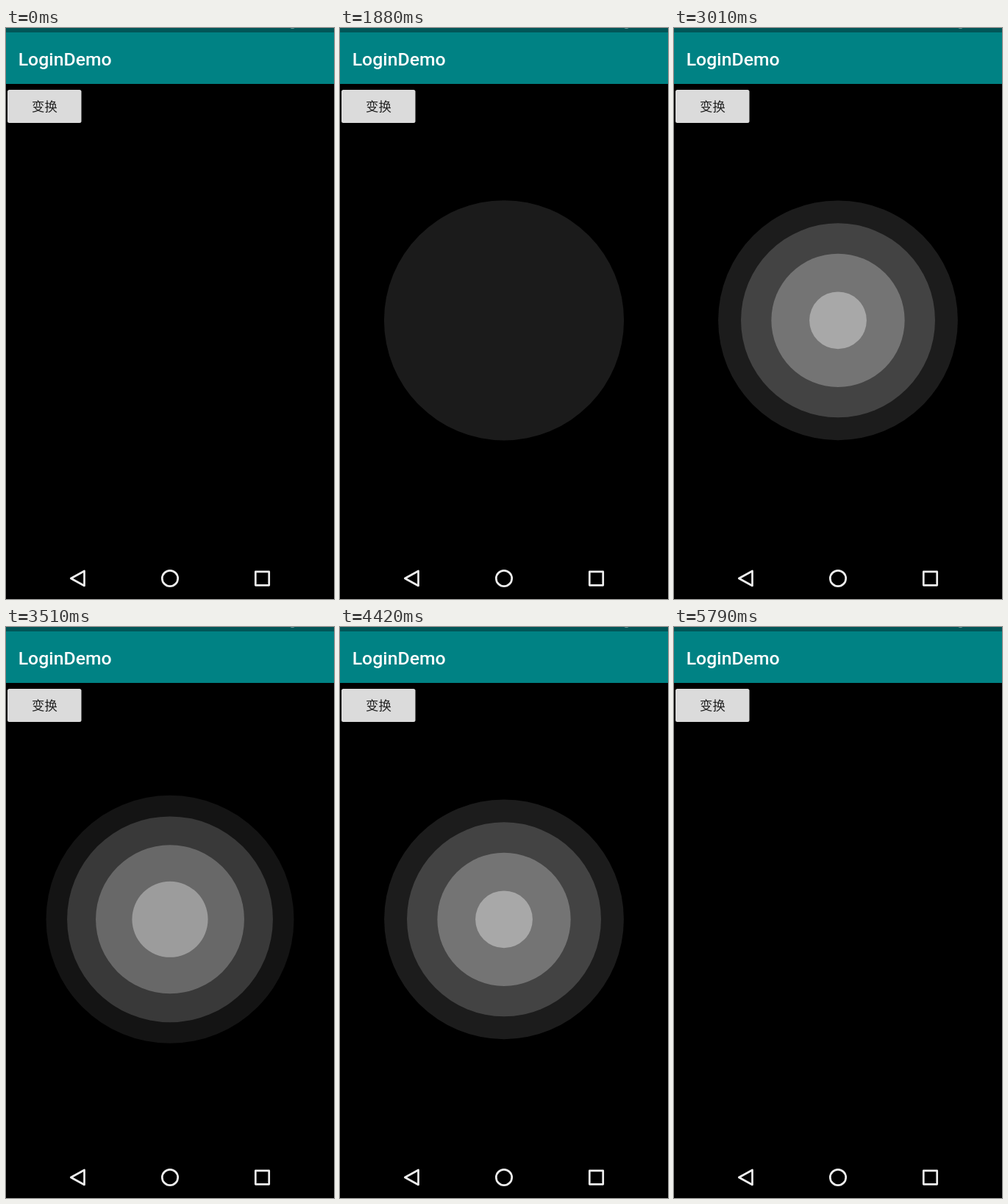
An HTML page that plays this animation: 446x776 px, repeating every 6240 ms.

```html
<!DOCTYPE html>
<html lang="zh">
<head>
<meta charset="utf-8">
<title>LoginDemo</title>
<style>
  html, body { margin: 0; width: 100%; height: 100%; overflow: hidden; background: #000; }
  svg { display: block; width: 100%; height: 100%; }
  .title { font: 500 24.8px Roboto, sans-serif; fill: #fff; }
  .label { font: 400 17.4px "Noto Sans CJK SC", "Noto Sans CJK", sans-serif; fill: #222; text-anchor: middle; }
  .nav { fill: none; stroke: #eee; stroke-width: 2.7; stroke-linejoin: round; }
</style>
</head>
<body>
<svg viewBox="0 0 446 776">
  <rect width="446" height="776"/>
  <rect width="446" height="76" fill="#008284"/>
  <rect width="446" height="6" fill="#025658"/>
  <ellipse cx="389.5" cy="-0.5" rx="3" ry="1.4" fill="#6b9c9d"/>
  <text class="title" x="16.7" y="50.7">LoginDemo</text>
  <rect x="2" y="84" width="100.5" height="45" rx="2.5" fill="#dbdbdb"/>
  <text class="label" x="52.5" y="113">变换</text>
  <g id="rings" fill="#fff"></g>
  <g class="nav">
    <path d="M88.3 748 L106.5 738 V758 Z"/>
    <circle cx="223" cy="748" r="10.7"/>
    <rect x="339.3" y="738.9" width="18.4" height="18.4"/>
  </g>
</svg>
<script>
const LOOP = 6240;
const COUNT = 11;
const PERIOD = 282;    // ms between two rings
const START = 1882;    // moment the first ring reaches age 0
const BIRTH = -0.78;   // age, in periods, at which a ring fades in
const SLOW_AT = 4980;  // the pace drops slightly near the end
const SLOW = 0.94;

const group = document.getElementById("rings");
const rings = Array.from({ length: COUNT }, () => {
  const ring = document.createElementNS("http://www.w3.org/2000/svg", "circle");
  ring.setAttribute("cx", 223);
  ring.setAttribute("cy", 397.3);
  group.appendChild(ring);
  return ring;
});

// Rings shrink towards the centre with constant acceleration.
const radiusAt = age => 163 - 25.7 * age - 5.2 * age * age;

const alphaAt = (age, r) => Math.max(0, Math.min(0.45 - 0.0021 * r, 0.11 + 0.14 * age));

function render(time) {
  const t = time < SLOW_AT ? time : SLOW_AT + (time - SLOW_AT) * SLOW;
  rings.forEach((ring, i) => {
    const age = (t - START) / PERIOD - i;
    const r = age > BIRTH ? Math.max(0, radiusAt(age)) : 0;
    ring.setAttribute("r", r.toFixed(2));
    ring.setAttribute("fill-opacity", alphaAt(age, r).toFixed(4));
  });
}

const origin = performance.now();
function tick() {
  render((performance.now() - origin) % LOOP);
  requestAnimationFrame(tick);
}
tick();
</script>
</body>
</html>
```
